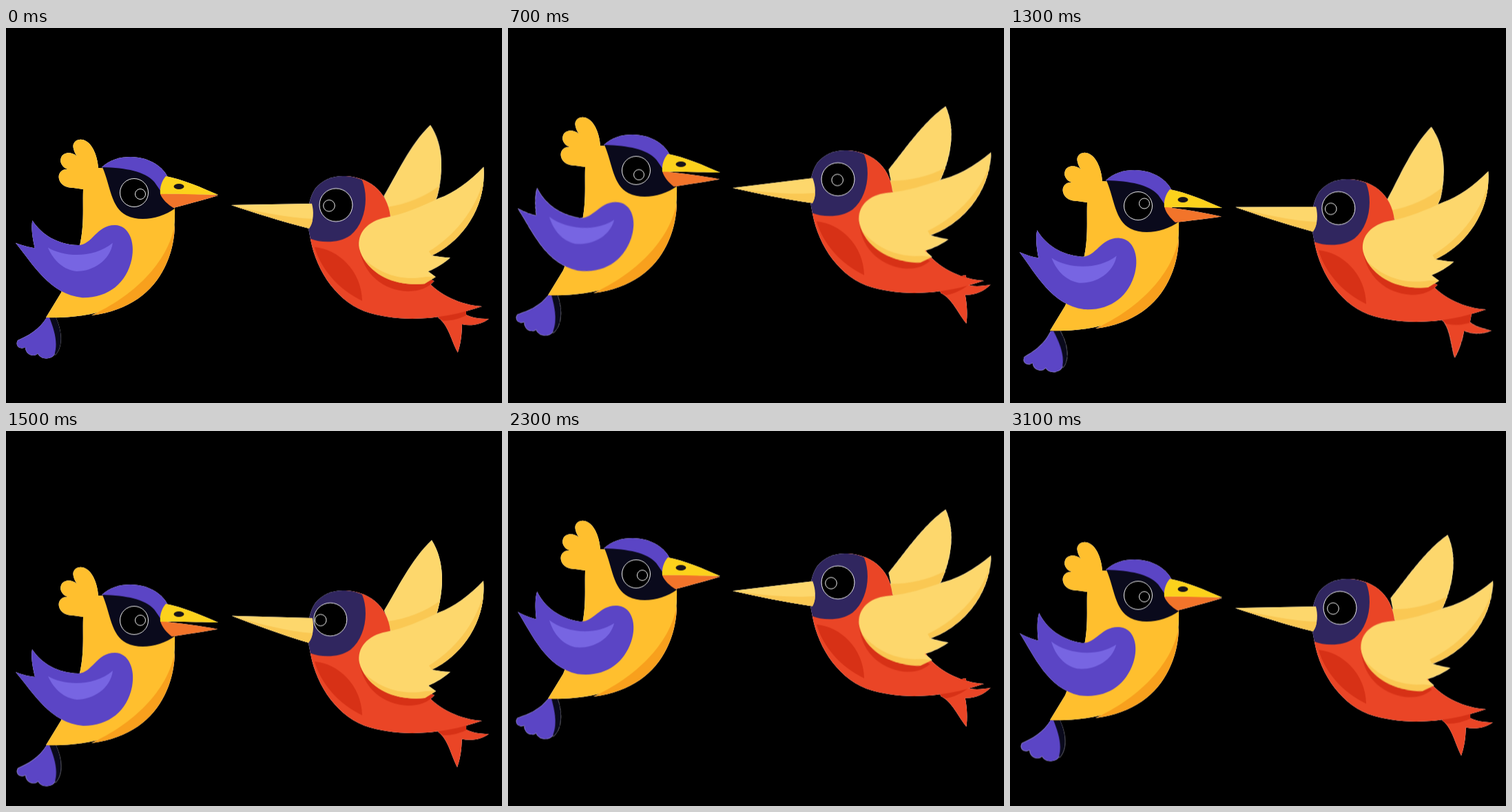
Write an HTML page that moves like this. It is 720 px wide and 544 px high and loops after 3.2 s.

```html
<!DOCTYPE html>
<html lang="en">
<head>
<meta charset="utf-8">
<title>Two birds</title>
<style>
  html, body { margin: 0; width: 100%; height: 100%; overflow: hidden; background: #000; }
  svg { display: block; width: 100vw; height: 100vh; }
  .bird { filter: drop-shadow(0 0 .6px #fff); }
  .eye circle { fill: #000; stroke: #f4f4f4; stroke-width: 1; }
  .gold { fill: #ffbf2e; }
  .violet { fill: #5b45c5; }
  .ink { fill: #0a0a1c; }
  .red { fill: #ea4526; }
  .redShade { fill: #d73116; }
  .cream { fill: #fdd76c; }
  .creamShade { fill: #fac853; }
</style>
</head>
<body>
<svg viewBox="0 0 720 544">
  <g id="leftBird" class="bird">
    <g id="leftTail">
      <path class="ink" d="M59 419L72 419C82 440 83 464 71 475Z"/>
      <path class="violet" d="M59 420C48 438 31 447 17 453C12 462 22 467 28 463C28 475 42 478 46 472C50 482 66 481 70 474C76 457 70 438 63 420Z"/>
    </g>
    <path class="gold" d="M134 203C133 188 127 170 116 164C106 158 95 165 98 175C99 180 101 183 103 186C95 179 83 180 80 188C77 196 83 203 90 205C81 204 75 211 77 219C79 228 88 232 98 232L112 234C111 260 114 285 107 316L80 384L58 420C115 422 182 408 218 364C237 339 246 302 245 262L220 210Z"/>
    <path fill="#f8a01d" d="M245 285C235 342 183 390 124 417C180 410 213 382 230 348C242 325 245 300 245 285Z"/>
    <path class="violet" d="M139 202C151 191 165 187 181 187C207 187 229 201 236 219L226 240Z"/>
    <path class="ink" d="M140 202C175 203 201 208 215 223C223 234 235 254 245 262C226 276 195 282 175 272C152 260 152 230 140 202Z"/>
    <path id="lowerBill" fill="#f2742a" d="M224 241C250 240 285 241 308 243C281 251 258 257 243 261C235 256 227 249 224 241Z"/>
    <path fill="#fcd21c" d="M232 215C255 219 285 232 308 242C285 242 250 240 224 241C223 231 226 222 232 215Z"/>
    <ellipse cx="251" cy="230" rx="7.5" ry="4" fill="#17131a"/>
    <g class="eye">
      <circle cx="186" cy="239" r="20.5"/>
      <circle id="leftPupil" cx="186" cy="239" r="7.5"/>
    </g>
    <g id="leftWing">
      <path class="violet" d="M14 314C25 318 33 320 42 321C38 305 36 290 38 281C52 302 75 315 105 316C126 315 131 286 158 286C178 286 188 310 183 335C176 370 150 392 112 392C65 388 40 345 14 314Z"/>
      <path fill="#7765e2" d="M61 320C85 334 128 335 155 312C152 338 126 354 103 354C85 352 70 340 61 320Z"/>
    </g>
  </g>

  <g id="rightBird" class="bird">
    <g id="backWing">
      <path class="cream" d="M618 142C588 170 567 215 549 244L565 290L605 290L626 246C636 212 637 172 618 142Z"/>
      <path class="creamShade" d="M553 260C582 256 608 246 630 230L626 246L605 290L565 290Z"/>
    </g>
    <g id="rightTail">
      <path class="red" d="M622 400L628 421C642 431 647 455 656 471C660 460 662 445 662 430C675 433 690 430 701 422C686 422 674 420 666 415L668 402Z"/>
      <path class="redShade" d="M622 400L628 421L635 425C648 425 658 422 668 417L668 402Z"/>
    </g>
    <path class="red" d="M441 300C447 345 475 393 520 411C575 430 640 422 691 404C660 402 630 388 610 366L558 274C554 236 525 215 489 215Z"/>
    <path class="redShade" d="M448 318C482 321 516 352 517 396C483 380 457 350 448 318Z"/>
    <path fill="#30265f" d="M489 215C500 215 509 217 517 221C527 246 522 283 500 301C483 313 457 312 442 306C436 282 436 252 449 233C459 221 473 215 489 215Z"/>
    <g id="bill">
      <path class="cream" d="M327 257L444 255C447 266 447 281 440 291C400 281 360 268 327 257Z"/>
      <path class="creamShade" d="M327 257C365 267 410 276 445 277C445 282 443 287 440 291C400 281 360 268 327 257Z"/>
    </g>
    <g class="eye">
      <circle id="rightEye" cx="479" cy="257" r="24"/>
      <circle id="rightPupil" cx="479" cy="257" r="8.3"/>
    </g>
    <g id="frontWing">
      <path class="redShade" d="M513 318C518 357 548 381 584 382C600 382 613 377 622 367Z"/>
      <path class="cream" d="M693 201C672 223 650 239 628 247C602 259 578 270 552 275C525 280 509 298 513 320C521 352 560 376 608 371L624 361L613 353C625 348 636 341 645 333C635 333 627 331 618 330C660 310 698 260 693 201Z"/>
      <path class="creamShade" d="M693 220C681 265 650 302 614 324L618 330C657 312 690 270 693 220ZM520 335C540 354 570 368 610 361L624 361L608 371C568 375 535 361 520 335Z"/>
    </g>
  </g>
</svg>
<script>
const LOOP = 3200, STEP = 100;
const { PI, sin, cos, max, floor } = Math;
const $ = id => document.getElementById(id);
const move = (id, x, y) => $(id).setAttribute("transform", `translate(${x} ${y})`);
const turn = (id, angle, x, y) => $(id).setAttribute("transform", `rotate(${angle} ${x} ${y})`);

// Eases through evenly spaced poses, then back to the first one.
function glide(time, period, ...poses) {
  const position = time / period * poses.length, i = floor(position);
  const from = poses[i % poses.length], to = poses[(i + 1) % poses.length];
  return from + (to - from) * (1 - cos(PI * (position - i))) / 2;
}

function draw(time) {
  const leftY = glide(time + 30, LOOP, 0, -33, 37, -33);
  const rightY = glide(time + 45, LOOP, 0, -38, 17, -38);
  const swing = glide(time + 30, LOOP / 2, 0, -8, 7, -8);

  // The wings beat twice as fast near the end of the loop.
  const beat = 2 * PI * (time + 100 + max(0, time - 2300)) / 1600;

  const chatter = time > 300 && time < 1900 ? sin(PI * (time - 300) / 1600) : 0;
  const glance = chatter * cos(2 * PI * (time - 700) / 1200);
  const eyeX = -max(0, rightY) / 2;

  move("leftBird", 0, leftY);
  turn("leftWing", 5.7 - 3.8 * cos(beat) - 1.9 * cos(2 * beat), 165, 305);
  turn("leftTail", swing, 66, 420);
  turn("lowerBill", 9 * chatter, 228, 242);
  move("leftPupil", 9 - 7 * max(0, glance), 2 + 6 * glance);

  move("rightBird", 0, rightY);
  turn("frontWing", 3.1 * (1 - cos(beat)), 540, 285);
  turn("backWing", 4 * (cos(2 * beat) - cos(beat)), 560, 270);
  turn("rightTail", -1.8 * swing, 635, 418);
  turn("bill", rightY * .16, 445, 272);
  move("rightEye", eyeX, 0);
  move("rightPupil", 1.5 * eyeX - 10 + 13 * max(0, glance), 1);
}

const start = performance.now();
function tick() {
  const elapsed = (performance.now() - start) % LOOP;
  draw(floor(elapsed / STEP) * STEP);
  requestAnimationFrame(tick);
}
tick();
</script>
</body>
</html>
```
